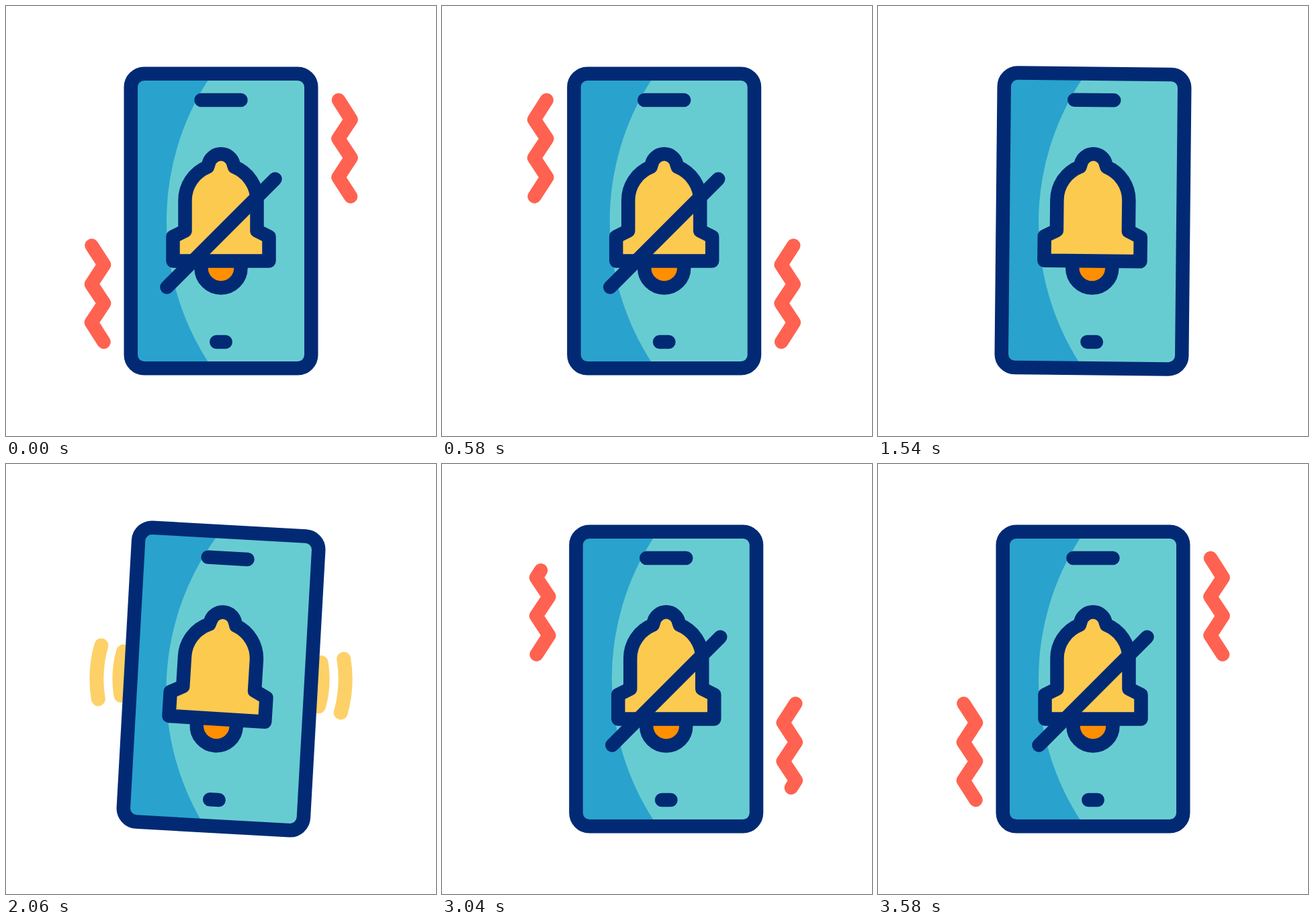
These frames come from a looping animation (640x640 px, 3600 ms). An HTML page:

```html
<!DOCTYPE html>
<html lang="en">
<head>
<meta charset="utf-8">
<title>Silent and ringing phone</title>
<style>
  html, body { margin: 0; width: 100%; height: 100%; overflow: hidden; background: #fff; }
  svg { display: block; width: 100%; height: 100%; }
  .line { fill: none; stroke: #022a74; stroke-width: 20.5; stroke-linecap: round; stroke-linejoin: round; }
  .zig { stroke: #ff6250; }
  .wave { stroke: #fdca50; stroke-width: 21; }
</style>
</head>
<body>
<svg viewBox="0 0 640 640">
  <g id="waves">
    <path class="line wave"/><path class="line wave"/>
  </g>
  <g id="shake">
    <g id="zigs">
      <path id="zigTop" class="line zig" pathLength="100" d="M495 140L513.5 169L494.5 197.5L513.5 226L494.5 255L513 283.5"/>
      <path id="zigLow" class="line zig" pathLength="100" d="M127.5 356.5L146 385L127 414L146 442.5L127 471L145.5 500"/>
    </g>
    <g id="phone">
      <rect x="186" y="101" width="268" height="438" rx="20" fill="#67ccd1"/>
      <path d="M301 110A386.6 386.6 0 0 0 301 530H190V110Z" fill="#29a2ce"/>
      <rect class="line" x="185.75" y="100.75" width="268.5" height="438.5" rx="20"/>
      <path class="line" d="M290.5 140H349.5"/>
      <path id="button" class="line" d="M313.3 500H326.7"/>
    </g>
    <g id="bell">
      <path class="line" style="fill:#ff8f00" d="M290.5 380V390A29.5 29.5 0 0 0 349.5 390V380"/>
      <path class="line" style="fill:#fdca50" d="M248.5 379.5V343.5L266.5 334.5V289A53.5 53.5 0 0 1 300 239.5L301.5 235A19 19 0 0 1 338.5 235L340 239.5A53.5 53.5 0 0 1 373.5 289V334.5L391.5 343.5V379.5Z"/>
    </g>
    <path id="slash" class="line" pathLength="100" d="M400.5 257.5L239.5 418.5"/>
  </g>
</svg>
<script>
const STEP = 20, COUNT = 180;
const $ = id => document.getElementById(id);
const set = (el, name, value) => el.setAttribute(name, value);
const clamp = u => Math.max(0, Math.min(1, u));
const ease = u => u * u * (3 - 2 * u);
const progress = (f, from, to) => ease(clamp((f - from) / (to - from)));

// Eased motion through [time, value] keys
function follow(keys, f) {
  let value = keys[0][1];
  for (let i = 1; i < keys.length; i++) {
    value += (keys[i][1] - keys[i - 1][1]) * progress(f, keys[i - 1][0], keys[i][0]);
  }
  return value;
}

const SWING = 17.5, TILT = 4, BEAT = 53 / 6;
const shakeKeys = [0, 1, -1, 1, -1, 1, 0].map((s, i) => [i * BEAT, s * SWING])
  .concat([[145, 0], [155, SWING], [166, -SWING], [179, 0]]);
const tiltKeys = [[74.5, 0]];
for (let i = 0; i < 7; i++) tiltKeys.push([85 + i * 8.2, i % 2 ? -TILT : TILT]);
tiltKeys.push([143, 0]);

function trim(el, length, fromEnd) {
  set(el, 'stroke-dasharray', `${Math.max(length, 0.1)} 300`);
  set(el, 'stroke-dashoffset', fromEnd ? length - 100 : 0);
  set(el, 'visibility', length > 0 ? 'visible' : 'hidden');
}

function arcPair(r) {
  const x = r * Math.cos(0.218), y = r * Math.sin(0.218);
  return [-1, 1].map(s =>
    `M${320 + s * x} ${320 - y}A${r} ${r} 0 0 ${s > 0 ? 1 : 0} ${320 + s * x} ${320 + y}`).join('');
}

function draw(f) {
  const x = follow(shakeKeys, f), tilt = follow(tiltKeys, f);
  set($('shake'), 'transform', `translate(${x} 0)`);
  set($('phone'), 'transform', `rotate(${tilt} 320 320)`);
  set($('bell'), 'transform', `rotate(${tilt * 1.1} 320 280)`);

  // The zigzags swap sides with the direction of the shake
  set($('zigs'), 'transform', x > 0.01 ? 'matrix(-1 0 0 1 640 0)' : '');
  const zig = 100 * (f < 90 ? 1 - progress(f, 35, 44.6) : progress(f, 145, 154));
  trim($('zigTop'), zig, true);
  trim($('zigLow'), zig, false);
  trim($('slash'), f < 63 ? 100 : 100 * progress(f, 138, 150), false);

  const pressed = f >= 129 && f < 136;
  $('button').style.stroke = pressed ? '#fff' : '';
  $('button').style.strokeWidth = pressed ? 23.5 : '';

  const out = progress(f, 88, 124), radius = 105 + 213 * out;
  const waves = $('waves');
  set(waves, 'transform', `rotate(${tilt} 320 320)`);
  set(waves, 'opacity', f > 88 ? 1 - out * out : 0);
  set(waves.children[0], 'd', arcPair(radius));
  set(waves.children[1], 'd', arcPair(radius - 34));
}

const start = performance.now();
function tick() {
  draw(Math.floor((performance.now() - start) / STEP) % COUNT);
  requestAnimationFrame(tick);
}
tick();
</script>
</body>
</html>
```
